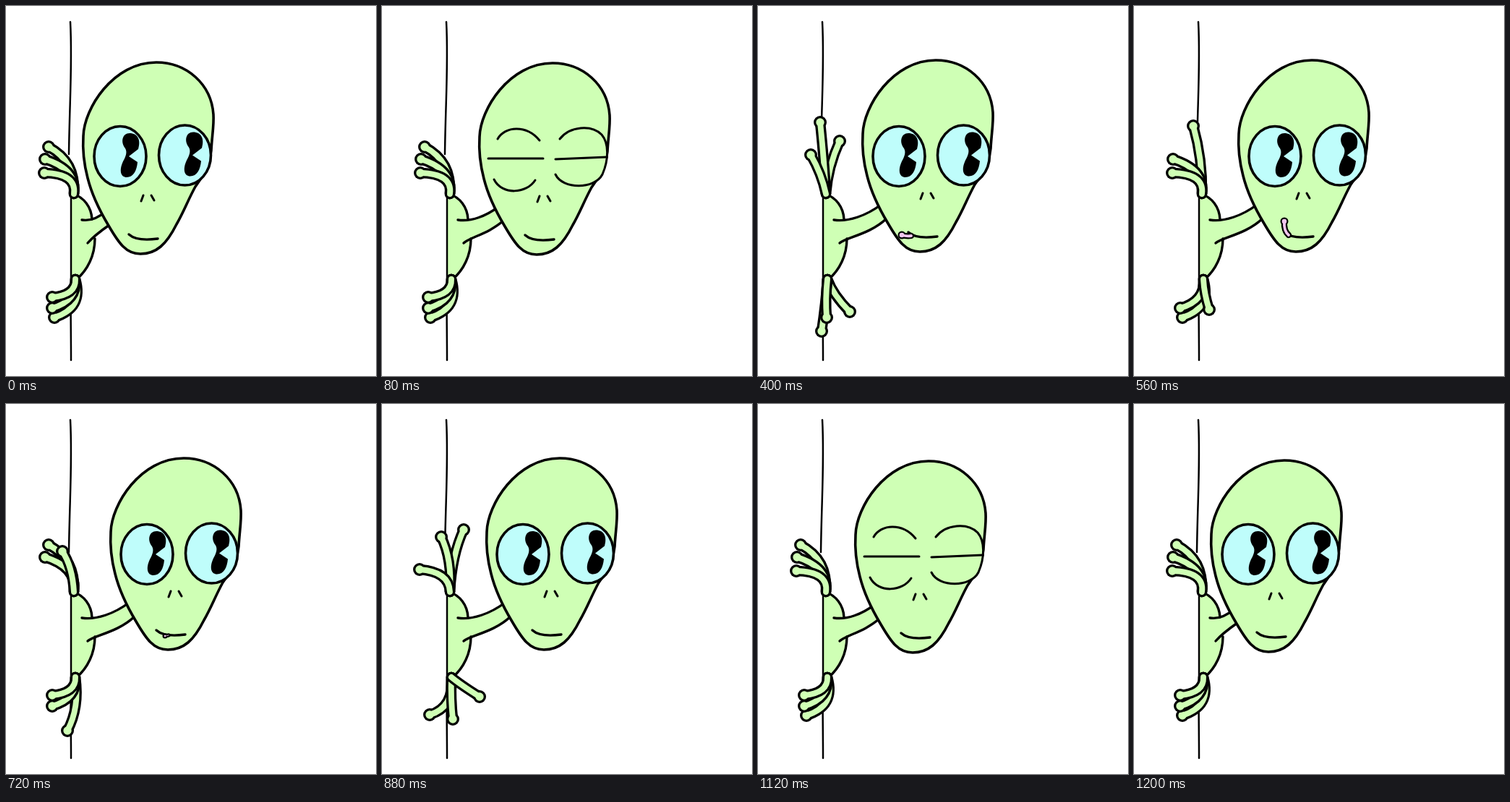
An HTML page with a canvas that plays this animation: 512 by 512 pixels, repeating every 1620 ms.

```html
<!DOCTYPE html>
<html lang="en">
<head>
<meta charset="utf-8">
<title>Peeking alien</title>
<style>
html, body { margin: 0; height: 100%; overflow: hidden; background: #fff; }
canvas { display: block; width: 100vmin; height: 100vmin; }
</style>
</head>
<body>
<canvas id="stage" width="512" height="512"></canvas>
<script>
const g = document.getElementById('stage').getContext('2d');
const LOOP = 1620, STEP = 80, LAST = 15;
const SKIN = '#cfffb5', EYE = '#bffdfb', PINK = '#f3c6f0', INK = '#000';

// Each finger is [control x, control y, tip x, tip y]; hands hold three, from top to bottom.
const rest = [
  [97, 215, 59, 195], [99, 226, 54, 212], [98, 232, 53, 231],
  [97, 400, 64, 403], [99, 408, 64, 418], [108, 418, 67, 431]
];
const pose = changes => rest.map((finger, i) => changes[i] || finger);
const lift = pose({ 2: [92, 225, 78, 204], 5: [102, 420, 85, 452] });
const up = pose([
  [97, 222, 113, 187], [92, 220, 86, 161], [88, 232, 73, 206],
  [93, 405, 95, 431], [94, 410, 88, 450], [104, 400, 127, 423]
]);
const fan = pose({
  0: [97, 208, 113, 174], 1: [97, 215, 82, 184], 2: [93, 232, 52, 229],
  3: [108, 388, 135, 405], 4: [95, 408, 98, 436], 5: [100, 420, 66, 430]
});
const last = pose({ 0: [95, 212, 82, 166], 3: [97, 398, 104, 420] });
const mix = (a, b) => a.map((f, i) => f.map((v, j) => (v + b[i][j]) / 2));
const hands = [rest, rest, rest, lift, mix(lift, up), up, fan, last,
               rest, lift, up, fan, last, rest, rest, rest];

// Tongue: [base x, base y, control x, control y, tip x, tip y, tip radius]
const dab = [187, 323, 184, 324, 182, 324, 3.5];
const side = [174, 321, 168, 322, 161, 320, 5.5];
const curl = [176, 320, 169, 314, 170, 301, 5.5];
const between = (a, b) => a.map((v, i) => (v + b[i]) / 2);
const tongues = { 3: dab, 4: between(dab, side), 5: side, 6: between(side, curl),
                  7: curl, 8: curl, 9: dab };

const shifts = { 0: 0, 1: 28, 2: 33, 13: 33, 14: 28, 15: 0 };
const shut = [1, 2, 13, 14];

function shape(d, fill, width = 3.4) {
  const p = new Path2D(d);
  if (fill) { g.fillStyle = fill; g.fill(p); }
  if (width) { g.strokeStyle = INK; g.lineWidth = width; g.stroke(p); }
}

function limb(bx, by, cx, cy, tx, ty, r, shaft, line, fill) {
  const p = new Path2D(`M${bx},${by} Q${cx},${cy} ${tx},${ty}`);
  for (const [color, inset] of [[INK, 0], [fill, line]]) {
    g.strokeStyle = g.fillStyle = color;
    g.lineWidth = shaft - 2 * inset;
    g.stroke(p);
    g.beginPath();
    g.arc(tx, ty, r - inset, 0, 7);
    g.fill();
  }
}

function body(dx) {
  const k = dx / 38;
  const at = (a, b) => a + (b - a) * k;
  const top = `C${at(118, 125)},${at(298, 299)} ${at(128, 150)},${at(293, 290)} ${at(138, 170)},${at(284, 275)}`;
  const low = `C${at(120, 122)},320 ${at(130, 155)},${at(312, 316)} ${at(143, 178)},${at(303, 294)}`;
  shape('M91,260 C108,264 119,278 119,294 L123,322 C123,345 113,365 97,378 L91,374Z', SKIN, 0);
  shape(`M105,296 ${top} L${at(143, 178)},${at(303, 294)} C${at(130, 155)},${at(312, 316)} ${at(120, 122)},320 113,328Z`, SKIN, 0);
  shape('M93,260 C108,265 118,278 119,295 M123,322 C123,345 113,365 98,378');
  shape(`M105,296 ${top} M113,328 ${low}`);
  shape('M89,22 C92,80 88,130 87,205 M90,262 V375 C89,410 90,450 90,490', null, 2.5);
}

function eye(x, y, pupilX) {
  g.fillStyle = EYE;
  g.strokeStyle = INK;
  g.lineWidth = 3.6;
  g.beginPath();
  g.ellipse(x, y, 36, 41.5, 0, 0, 7);
  g.fill();
  g.stroke();
  g.save();
  g.translate(pupilX, y);
  shape('M11,0 L24,-10 C28,-23 23,-32 12,-32 C2,-32 -1,-20 6,-11 C9,-6 7,0 3,7 C-3,20 0,29 8,29 C17,29 22,20 23,8Z', INK, 0);
  g.restore();
}

function head(step, dx) {
  const closed = shut.includes(step);
  const dy = closed ? 1 : dx ? -3 : 0;
  g.save();
  g.translate(dx, dy);
  shape('M208,78 C250,78 284,108 287,150 C288,165 285,180 284,200 C281,225 270,238 262,250 C252,268 246,285 236,302 C222,330 208,343 186,343 C166,343 156,328 142,304 C130,284 118,258 113,238 C107,215 106,195 107,180 C108,142 148,78 208,78Z', SKIN, 3.6);
  shape('M190,262 L187,270 M201,262 L205,269', null, 3);
  shape('M170,316 Q181,326 210,322');
  const t = tongues[step];
  if (t) limb(...t, t[6] * 1.5, 2.2, PINK);
  g.translate(0, -dy);
  if (closed) {
    shape('M218,184 C232,166 262,164 276,178 C286,190 286,212 277,233 C266,254 222,254 212,233', SKIN, 3);
    shape('M132,184 C142,166 172,164 190,186 M119,211 H195 M127,240 C138,262 172,260 184,241 M212,212 L283,209', null, 3);
  } else {
    g.translate(-dx / 38, 0);
    eye(158, 208, 159);
    eye(247.5, 206.5, 247);
  }
  g.restore();
}

function draw(now) {
  const step = Math.min(LAST, Math.floor(now % LOOP / STEP));
  const dx = shifts[step] ?? 38;
  g.fillStyle = '#fff';
  g.fillRect(0, 0, 512, 512);
  g.lineCap = g.lineJoin = 'round';
  body(dx);
  head(step, dx);
  for (const i of [0, 1, 2, 5, 4, 3]) {
    const base = i < 3 ? [94, 260] : [96, 378];
    limb(...base, ...hands[step][i], 9, 14.5, 3.3, SKIN);
  }
}

const start = performance.now();
function tick() {
  draw(performance.now() - start);
  requestAnimationFrame(tick);
}
tick();
</script>
</body>
</html>
```
